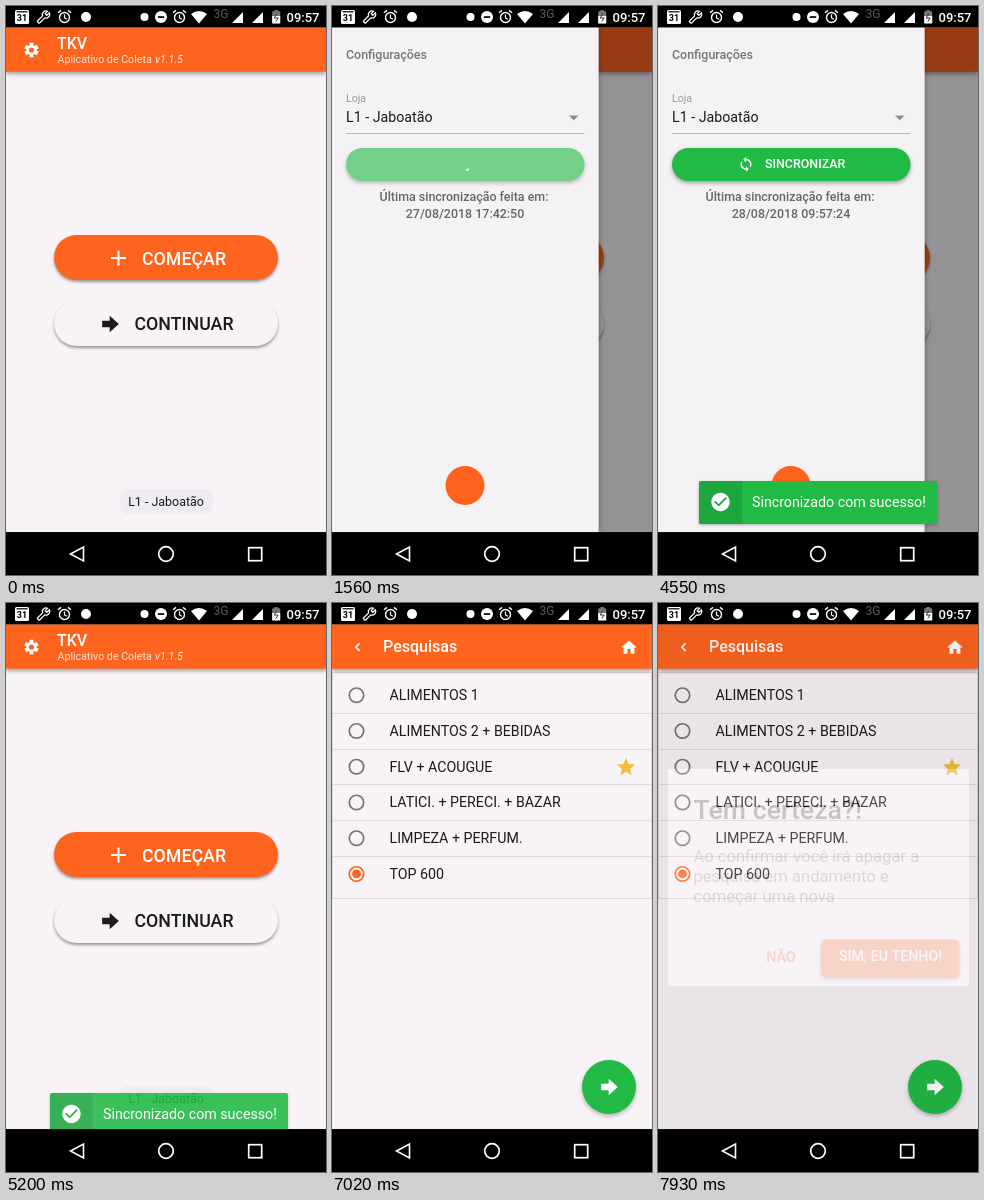
Animation of 320 by 569 pixels, one loop 8 s. Source, as an HTML page with a canvas:

```html
<!DOCTYPE html>
<html lang="pt-BR">
<head>
<meta charset="utf-8">
<title>Aplicativo de Coleta</title>
<style>
html, body { margin: 0; width: 100%; height: 100%; overflow: hidden; background: #000; }
canvas { display: block; width: 100%; height: 100%; }
</style>
</head>
<body>
<canvas id="stage"></canvas>
<script>
const W = 320, H = 569, LOOP = 8000, STEP = 130;
const TOP = 21.33, BOTTOM = 526.2, BODY = BOTTOM - TOP;
const ORANGE = '#ff641f', GREEN = '#21ba45', BG = '#f7f3f7', INK = '#1b1b1b', WHITE = '#fff';
const canvas = document.getElementById('stage');
const layer = document.createElement('canvas').getContext('2d');
let ctx = canvas.getContext('2d');
let scale = 1;

const ICONS = {
  sync: 'M12 4V1L8 5l4 4V6c3.31 0 6 2.69 6 6 0 1.01-.25 1.97-.7 2.8l1.46 1.46C19.54 15.03 20 13.57 20 12c0-4.42-3.58-8-8-8zm0 14c-3.31 0-6-2.69-6-6 0-1.01.25-1.97.7-2.8L5.24 7.74C4.46 8.97 4 10.43 4 12c0 4.42 3.58 8 8 8v3l4-4-4-4v3z',
  home: 'M10 20v-6h4v6h5v-8h3L12 3 2 12h3v8z',
  check: 'M12 2C6.48 2 2 6.48 2 12s4.48 10 10 10 10-4.48 10-10S17.52 2 12 2zm-2 15l-5-5 1.41-1.41L10 14.17l7.59-7.59L19 8l-9 9z',
  star: 'M12 17.27L18.18 21l-1.64-7.03L22 9.24l-7.19-.61L12 2 9.19 8.63 2 9.24l5.46 4.73L5.82 21z',
  arrow: 'M2 8h9V2l11 10-11 10v-6H2z',
  wrench: 'M1.3 19l9.1-9.1c-.9-2.3-.4-5 1.5-6.9 2-2 5-2.4 7.4-1.3L15 6l3 3 4.4-4.3c1.2 2.4.7 5.4-1.3 7.4-1.9 1.9-4.6 2.4-6.9 1.5l-9.1 9.1c-.4.4-1 .4-1.4 0l-2.3-2.3c-.5-.4-.5-1.1-.1-1.4z'
};
for (const key in ICONS) ICONS[key] = new Path2D(ICONS[key]);

const clamp = v => Math.max(0, Math.min(1, v));
const span = (t, a, b) => clamp((t - a) / (b - a));
const easeOut = p => 1 - (1 - p) ** 3;
const easeInOut = p => p < .5 ? 2 * p * p : 1 - 2 * (1 - p) ** 2;

// Draws onto a spare layer first, so overlapping parts fade as one
function fade(alpha, draw) {
  const base = ctx;
  ctx = layer;
  ctx.resetTransform();
  ctx.clearRect(0, 0, canvas.width, canvas.height);
  ctx.setTransform(base.getTransform());
  draw();
  ctx = base;
  ctx.resetTransform();
  ctx.globalAlpha = alpha;
  ctx.drawImage(layer.canvas, 0, 0);
}

function group(alpha, dx, dy, draw) {
  if (alpha <= 0) return;
  ctx.save();
  ctx.translate(dx, dy);
  if (alpha < 1) fade(alpha, draw);
  else draw();
  ctx.restore();
}

function rect(x, y, w, h, color) {
  ctx.fillStyle = color;
  ctx.fillRect(x, y, w, h);
}

function shape(build, color, lineWidth) {
  ctx.beginPath();
  build();
  if (lineWidth) {
    ctx.strokeStyle = color;
    ctx.lineWidth = lineWidth;
    ctx.stroke();
  } else {
    ctx.fillStyle = color;
    ctx.fill('evenodd');
  }
}

const disc = (x, y, r, color, lineWidth) =>
  shape(() => ctx.arc(x, y, r, 0, Math.PI * 2), color, lineWidth);

const round = (x, y, w, h, r, color) =>
  shape(() => ctx.roundRect(x, y, w, h, r), color);

function poly(points, color, lineWidth, open) {
  shape(() => {
    points.forEach(([x, y]) => ctx.lineTo(x, y));
    if (!open) ctx.closePath();
  }, color, lineWidth);
}

function shadow(blur, dy, alpha, draw) {
  ctx.save();
  ctx.shadowColor = `rgba(0,0,0,${alpha})`;
  ctx.shadowBlur = blur * scale;
  ctx.shadowOffsetY = dy * scale;
  draw();
  ctx.restore();
}

function text(str, x, y, size, color, style = '400', align = 'left') {
  ctx.font = `${style} ${size}px Roboto, sans-serif`;
  ctx.textAlign = align;
  ctx.fillStyle = color;
  ctx.fillText(str, x, y);
}

function icon(name, x, y, size, color, lineWidth) {
  ctx.save();
  ctx.translate(x - size / 2, y - size / 2);
  ctx.scale(size / 24, size / 24);
  if (lineWidth) {
    ctx.strokeStyle = color;
    ctx.lineWidth = lineWidth;
    ctx.stroke(ICONS[name]);
  } else {
    ctx.fillStyle = color;
    ctx.fill(ICONS[name]);
  }
  ctx.restore();
}

// Touch ripple that grows and fades inside a clip shape
function ripple(p, x, y, r, color, clip) {
  if (p <= 0 || p >= 1) return;
  ctx.save();
  ctx.beginPath();
  clip();
  ctx.clip();
  ctx.globalAlpha *= .28 * (1 - p);
  disc(x, y, r * easeOut(p), color);
  ctx.restore();
}

function alarm(x) {
  disc(x, 11.5, 5, WHITE, 1.4);
  poly([[x, 8.5], [x, 12], [x + 2.5, 13.3]], WHITE, 1.2, true);
  poly([[x - 6.5, 6.8], [x - 3.5, 4.4]], WHITE, 1.4, true);
  poly([[x + 6.5, 6.8], [x + 3.5, 4.4]], WHITE, 1.4, true);
}

function statusBar() {
  rect(0, 0, W, TOP, '#000');
  round(9, 4, 14, 14, 1.5, WHITE);
  rect(10.5, 5.2, 11, 1.2, '#000');
  text('31', 16, 15.3, 9, '#000', '700', 'center');
  icon('wrench', 37.5, 11, 13.5, WHITE, 2.2);
  alarm(58.5);
  disc(80, 11, 5, WHITE);
  disc(138.5, 11, 4, WHITE);
  disc(155, 11, 6, WHITE);
  rect(151.8, 10.2, 6.4, 1.7, '#000');
  alarm(173.5);
  shape(() => {
    ctx.moveTo(193, 17.5);
    ctx.lineTo(185, 8);
    ctx.quadraticCurveTo(193, 2, 201, 8);
    ctx.closePath();
  }, WHITE);
  text('3G', 207.5, 12, 12, '#5c5c5c');
  for (const x of [226, 246]) poly([[x, 17], [x + 11, 17], [x + 11, 6]], WHITE);
  rect(268.5, 4, 3.4, 2, '#777');
  round(266.2, 5.2, 8, 12.2, 1, '#777');
  rect(266.2, 10, 8, 7.4, WHITE);
  poly([[270.8, 7.5], [268.2, 12], [272.2, 12], [269.8, 15.5]], '#333', 1, true);
  text('09:57', 313.5, 15.7, 13, WHITE, '500', 'right');
}

function navBar() {
  rect(0, BOTTOM, W, H - BOTTOM, '#000');
  poly([[64.5, 548], [77.5, 541], [77.5, 555]], WHITE, 1.6);
  disc(160, 548, 7.3, WHITE, 1.7);
  ctx.strokeStyle = WHITE;
  ctx.strokeRect(242.7, 541.7, 13, 13);
}

function header() {
  shadow(4, 2, .35, () => rect(0, TOP, W, 44.4, ORANGE));
}

function gear(x, y) {
  const corners = [[-.36, 5.2], [-.27, 7.4], [.27, 7.4], [.36, 5.2]];
  shape(() => {
    for (let tooth = 0; tooth < 6; tooth++) {
      for (const [turn, r] of corners) {
        const a = (tooth + .5) * Math.PI / 3 + turn;
        ctx.lineTo(x + r * Math.cos(a), y + r * Math.sin(a));
      }
    }
    ctx.closePath();
  }, WHITE);
  disc(x, y, 2.6, ORANGE);
}

function pill(y, color) {
  shadow(3, 2, .38, () => round(48, y, 224, 45, 22.5, color));
}

function homePage(t) {
  rect(0, TOP, W, BODY, BG);
  header();
  gear(25.5, 44);
  ripple(span(t, 560, 1000), 25.5, 44, 20, WHITE, () => ctx.arc(25.5, 44, 20, 0, 7));
  text('TKV', 51, 43, 16, WHITE, '500');
  text('Aplicativo de Coleta', 51.5, 57, 10.67, 'rgba(255,255,255,.8)');
  text('v1.1.5', 149, 57, 10.67, 'rgba(255,255,255,.85)', 'italic 400');

  pill(229, ORANGE);
  rect(105, 251, 15, 2, WHITE);
  rect(111.5, 244.5, 2, 15, WHITE);
  text('COMEÇAR', 136, 258.5, 17.78, WHITE, '500');
  ripple(span(t, 5240, 5850), 160, 252, 130, WHITE, () => ctx.roundRect(48, 229, 224, 45, 22.5));

  pill(295, BG);
  icon('arrow', 104.5, 318, 20, INK);
  text('CONTINUAR', 128.5, 324.3, 17.78, INK, '500');

  round(114, 483, 93, 25, 8, '#efecf1');
  text('L1 - Jaboatão', 160, 499.6, 12.44, INK, '400', 'center');
}

// Indeterminate arc: one turn per 2 s while its dash grows and shrinks every 1.5 s
function spinner(x, y, r, ms) {
  const phase = ms % 1500 / 750;
  const grow = easeInOut(clamp(phase)), shrink = easeInOut(clamp(phase - 1));
  const from = 35 * grow + 89 * shrink;
  const to = Math.min(from + 1 + 88 * grow, 125);
  const turn = ms / 2000 * Math.PI * 2, unit = Math.PI * 2 / 125.66;
  shape(() => ctx.arc(x, y, r, turn + from * unit, turn + to * unit), WHITE, 1.8);
}

function syncButton(t) {
  const start = 1240, done = 3600;
  const alpha = 1 - .3 * span(t, start, start + 150) + .3 * span(t, done - 40, done + 250);
  group(alpha, 0, 0, () => {
    shadow(4, 2, .36, () => round(14, 142, 238.5, 33, 16.5, GREEN));
    if (t >= start && t < done) {
      spinner(133, 158.3, 6, (t - start) * .59);
    } else {
      icon('sync', 88, 158.3, 16.5, WHITE);
      text('SINCRONIZAR', 107, 162, 12.44, WHITE, '500');
    }
  });
  ripple(span(t, 1100, 1900), 133, 158, 190, WHITE, () => ctx.roundRect(14, 142, 238.5, 33, 16.5));
}

function drawer(t) {
  const open = easeOut(span(t, 600, 1080)) * (1 - easeInOut(span(t, 4880, 5190)));
  if (!open) return;
  rect(0, TOP, W, BODY, `rgba(0,0,0,${.4 * open})`);
  group(1, -270 * (1 - open), 0, () => {
    shadow(5, 0, .35, () => rect(0, TOP, 266.67, BODY, '#f5f2f6'));
    text('Configurações', 14, 53, 12.44, '#757575', '500');
    text('Loja', 14, 96, 10.67, '#9a989a');
    text('L1 - Jaboatão', 14, 116, 14.22, INK);
    poly([[237, 109.5], [246.5, 109.5], [241.75, 114.2]], '#8d8b8d');
    rect(14, 127, 238.5, 1, '#bdbbbd');
    syncButton(t);
    text('Última sincronização feita em:', 132, 195, 12.44, '#666', '500', 'center');
    const stamp = t < 3600 ? '27/08/2018 17:42:50' : '28/08/2018 09:57:24';
    text(stamp, 133, 211.5, 12.44, '#666', '500', 'center');
    disc(133, 479.5, 19.5, ORANGE);
  });
}

function toast(t) {
  const enter = easeOut(span(t, 3980, 4480));
  const leave = span(t, 5100, 5500);
  group(enter * clamp(1 - 2 * leave * leave), 12 * leave, 56 * (1 - enter) + 60 * leave, () => {
    shadow(3, 1, .3, () => round(41, 475, 238, 43, 2, GREEN));
    rect(41, 475, 43, 43, 'rgba(0,0,0,.1)');
    icon('check', 62.5, 496, 22, WHITE);
    text('Sincronizado com sucesso!', 94, 501.2, 14.22, WHITE);
  });
}

const ITEMS = ['ALIMENTOS 1', 'ALIMENTOS 2 + BEBIDAS', 'FLV + ACOUGUE',
  'LATICI. + PERECI. + BAZAR', 'LIMPEZA + PERFUM.', 'TOP 600'];

function fab(t) {
  group(1, 0, 75 * (1 - easeOut(span(t, 6300, 6760))), () => {
    shadow(4, 2, .28, () => disc(277, 484, 27, GREEN));
    icon('arrow', 277.5, 484, 20, WHITE);
    ripple(span(t, 7180, 7900), 277, 484, 30, WHITE, () => ctx.arc(277, 484, 27, 0, 7));
  });
}

function listPage(t) {
  rect(0, TOP, W, BODY, BG);
  ctx.strokeStyle = '#dcd9dc';
  ctx.lineWidth = 1;
  ctx.strokeRect(.5, 69.5, 319, 226);
  header();
  poly([[27.6, 40.3], [23.8, 44.1], [27.6, 47.9]], WHITE, 1.6, true);
  text('Pesquisas', 51, 49.2, 16, WHITE, '500');
  icon('home', 297, 44.5, 18.5, WHITE);
  ITEMS.forEach((label, i) => {
    const y = 92.2 + i * 35.75;
    const chosen = i === 5 && t >= 6370;
    if (i) rect(0, Math.round(y - 18), W, 1, '#dcd9dc');
    disc(24.5, y, 7.2, chosen ? ORANGE : '#757575', 1.7);
    if (chosen) disc(24.5, y, 4.4 * easeOut(span(t, 6300, 6600)), ORANGE);
    text(label, 57.5, y + 5, 14.22, INK);
  });
  ripple(span(t, 6300, 7000), 24.5, 271, 18, ORANGE, () => ctx.arc(24.5, 271, 18, 0, 7));
  icon('star', 294, 164, 22, '#ecc03c');
  fab(t);
}

function dialog(t) {
  const p = span(t, 7830, 8290);
  if (!p) return;
  // The dimming leaves the panel's own area clear
  shape(() => {
    ctx.rect(0, TOP, W, BODY);
    ctx.roundRect(10, 166, 301, 217, 2);
  }, `rgba(0,0,0,${.28 * p})`);
  group(p, 0, 0, () => {
    round(10, 166, 301, 217, 2, BG);
    text('Tem certeza?!', 35.5, 215.5, 26.67, INK, '500');
    ['Ao confirmar você irá apagar a', 'pesquisa em andamento e', 'começar uma nova'].forEach((line, i) =>
      text(line, 35.5, 259 + i * 20, 16.6, '#757575'));
    text('NÃO', 123, 358.5, 14.22, ORANGE, '500', 'center');
    shadow(4, 2, .4, () => round(163, 336.5, 138.5, 38, 5, ORANGE));
    text('SIM, EU TENHO!', 232.5, 358, 14.22, WHITE, '500', 'center');
  });
}

function draw(t) {
  const page = span(t, 5620, 6110);
  if (page < 1) {
    homePage(t);
    drawer(t);
  }
  group(page, 0, 0, () => listPage(t));
  toast(t);
  dialog(t);
  statusBar();
  navBar();
}

function frame(now) {
  const dpr = window.devicePixelRatio || 1;
  const w = Math.round(innerWidth * dpr), h = Math.round(innerHeight * dpr);
  if (canvas.width !== w || canvas.height !== h) {
    canvas.width = layer.canvas.width = w;
    canvas.height = layer.canvas.height = h;
  }
  scale = w / W;
  ctx.setTransform(scale, 0, 0, h / H, 0, 0);
  draw(Math.floor(now % LOOP / STEP) * STEP);
  requestAnimationFrame(frame);
}
requestAnimationFrame(frame);
</script>
</body>
</html>
```
